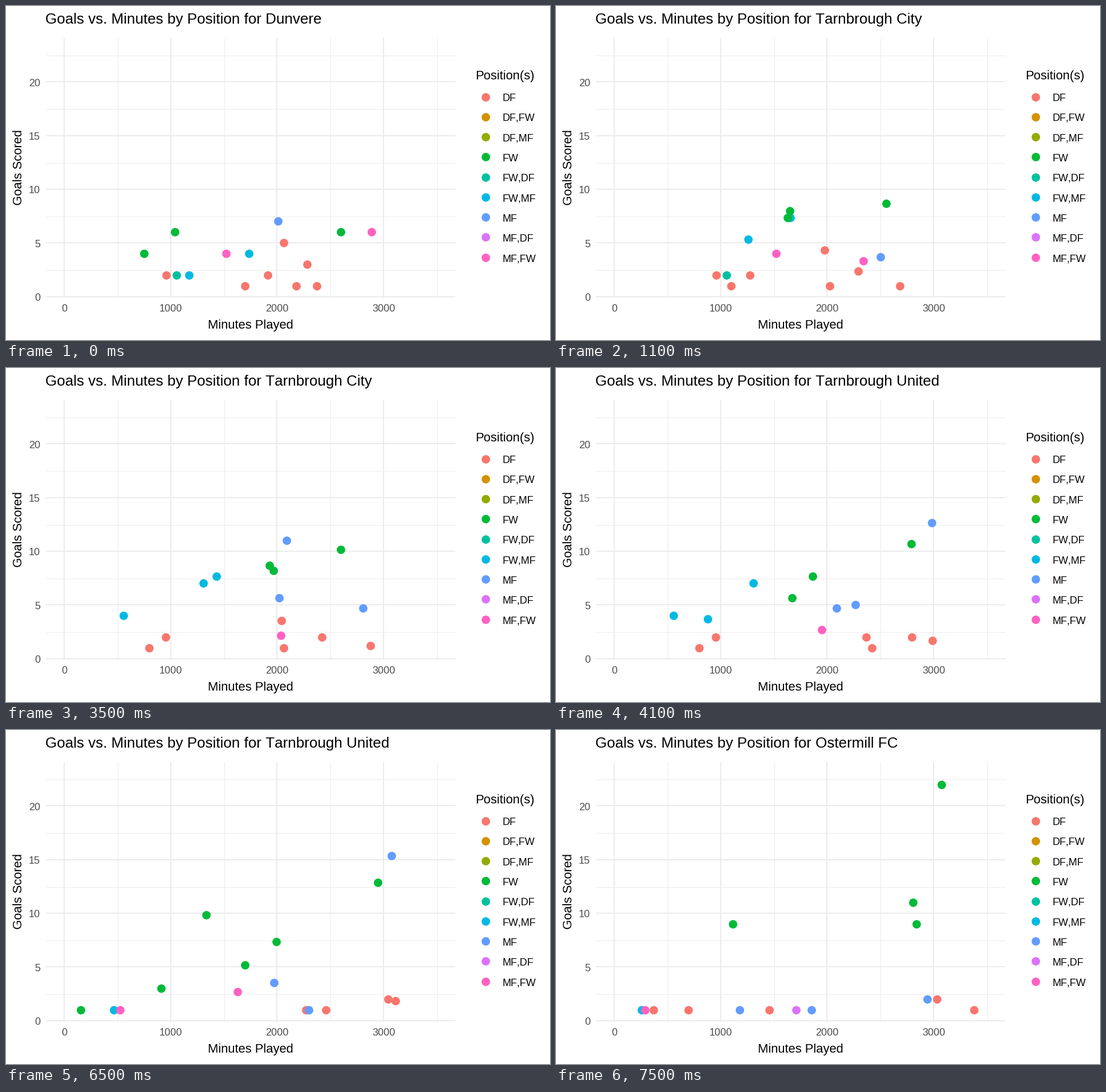
These frames come from a looping animation (954x587 px, 8000 ms). A matplotlib script:

```python
import numpy as np
import matplotlib.pyplot as plt
from matplotlib.animation import FuncAnimation

W, H = 954, 587
STEP, TWEENS, PERIOD, LEAD = 200, 6, 3000, 500   # ms, steps, ms, ms
LOOP, INTERVAL = 8000, 100
DOT = 14.8

COLORS = {
    "DF": "#F8766D", "DF,FW": "#D39200", "DF,MF": "#93AA00",
    "FW": "#00BA38", "FW,DF": "#00C19F", "FW,MF": "#00B9E3",
    "MF": "#619CFF", "MF,DF": "#DB72FB", "MF,FW": "#FF61C3",
}
CLUBS = ["Dunvere", "Tarnbrough City", "Tarnbrough United", "Ostermill FC"]


def squad(*players):
    """Players as (minutes, goals); bare minutes mean a single goal."""
    return [p if isinstance(p, tuple) else (p, 1) for p in players]


def crowd(lo, hi, bend, goals):
    """Players bunching up towards the most minutes."""
    k = np.linspace(0, 1, len(goals))
    return list(zip(lo + (hi - lo) * k ** bend, goals))


# Per position, one squad per club.
SQUADS = {
    "DF": [crowd(962, 2377, 0.36, (2, 1, 2, 5, 1, 3, 1)),
           squad(801, (959, 2), (1938, 4), 1949, (2302, 2), 2847),
           squad(2589, 2662, (3050, 2), (3066, 2)),
           squad(372, 697, 1458, (3037, 2), 3388)],
    "FW,DF": [squad((1061, 2)), [], [], []],
    "FW,MF": [squad((1174, 2), (1742, 4)),
              squad((562, 4), (1310, 7), (1619, 9)),
              squad(512),
              squad(257)],
    "FW": [squad((753, 4), (1045, 6), (2605, 6)),
           squad((2069, 9), (1954, 9), (2541, 10)),
           squad(158, (914, 3), (1383, 10), (1482, 4), (1828, 7), (2927, 11)),
           squad((1115, 9), (2814, 11), (2844, 9), (3082, 22))],
    "MF": [squad((2015, 7)),
           squad((2000, 6), (2032, 13), (2753, 2)),
           squad((2136, 4), 2393, (3104, 18)),
           squad(1184, 1860, (2946, 2))],
    "MF,DF": [[], [], [], squad(1710)],
    "MF,FW": [squad((1525, 4), (2892, 6)),
              squad((2069, 2)),
              squad(528, (1900, 3)),
              squad(294)],
}


def px(minutes):
    return 102.1 + 0.1865 * minutes


def py(goals):
    return 511 - 18.858 * goals


def center(x, y):
    return np.floor(x) + 0.5, np.floor(y) + 0.5


plt.rcParams["font.family"] = "Liberation Sans"
plt.rcParams["text.kerning_factor"] = 6   # practically no kerning
fig = plt.figure(figsize=(W / 72, H / 72), dpi=72, facecolor="white")
ax = fig.add_axes([0, 0, 1, 1])
ax.set_xlim(0, W)
ax.set_ylim(H, 0)
ax.axis("off")


def label(x, y, text, size, color="black", ha="left", **kw):
    return ax.text(x, y, text, fontsize=size, color=color, ha=ha,
                   va="baseline", **kw)


def grid(xs, ys, width):
    shift = 0.5 * (width % 2)
    style = dict(color="#EBEBEB", lw=width, zorder=1, capstyle="butt")
    ax.vlines([np.floor(px(x) + 0.5) + shift for x in xs], 56, 513, **style)
    ax.hlines([np.floor(py(y)) + shift for y in ys], 70, 788, **style)


def dots(points, colors):
    return ax.scatter(*zip(*points), s=DOT ** 2, c=colors, linewidths=0,
                      zorder=3)


grid(range(500, 3501, 1000), np.arange(2.5, 23, 5), 1)
grid(range(0, 3001, 1000), range(0, 21, 5), 2)

for m in range(0, 3001, 1000):
    label(px(m) + 0.5, 537, str(m), 18, "#4D4D4D", "center")
for g in range(0, 21, 5):
    label(60, round(py(g)) + 7, str(g), 18, "#4D4D4D", "right")
label(429, 567, "Minutes Played", 22, ha="center")
label(28, 284, "Goals Scored", 22, ha="center", rotation=90,
      rotation_mode="anchor")

label(823, 129, "Position(s)", 22)
rows = [160.2 + 35.25 * i for i in range(len(COLORS))]
dots([center(841, y) for y in rows], list(COLORS.values()))
for name, y in zip(COLORS, rows):
    label(870, round(y) + 7, name, 18)

title = label(69, 31, "", 26)
cloud = dots([(0, 0)], ["white"])


def tween(old, new, step):
    """Pair players from the last one back; the unpaired wait for the end."""
    if step == TWEENS:
        return new
    pairs = min(len(old), len(new))
    k = step / TWEENS
    stay, move = old[:len(old) - pairs], old[len(old) - pairs:]
    goal = new[len(new) - pairs:]
    return stay + [(a + (c - a) * k, b + (d - b) * k)
                   for (a, b), (c, d) in zip(move, goal)]


def draw(i):
    t = i * INTERVAL - LEAD
    leg = max(0, t // PERIOD)
    step = min(TWEENS, max(0, (t - leg * PERIOD) // STEP + 1))
    club = CLUBS[leg + (step > TWEENS // 2)]
    title.set_text(f"Goals vs. Minutes by Position for {club}")
    shown = [(center(px(m), py(g)), COLORS[pos])
             for pos, teams in SQUADS.items()
             for m, g in tween(teams[leg], teams[leg + 1], step)]
    cloud.set_offsets([p for p, _ in shown])
    cloud.set_facecolor([c for _, c in shown])
    return title, cloud


anim = FuncAnimation(fig, draw, frames=LOOP // INTERVAL, interval=INTERVAL,
                     repeat=True, repeat_delay=0, blit=False)
plt.show()
```
